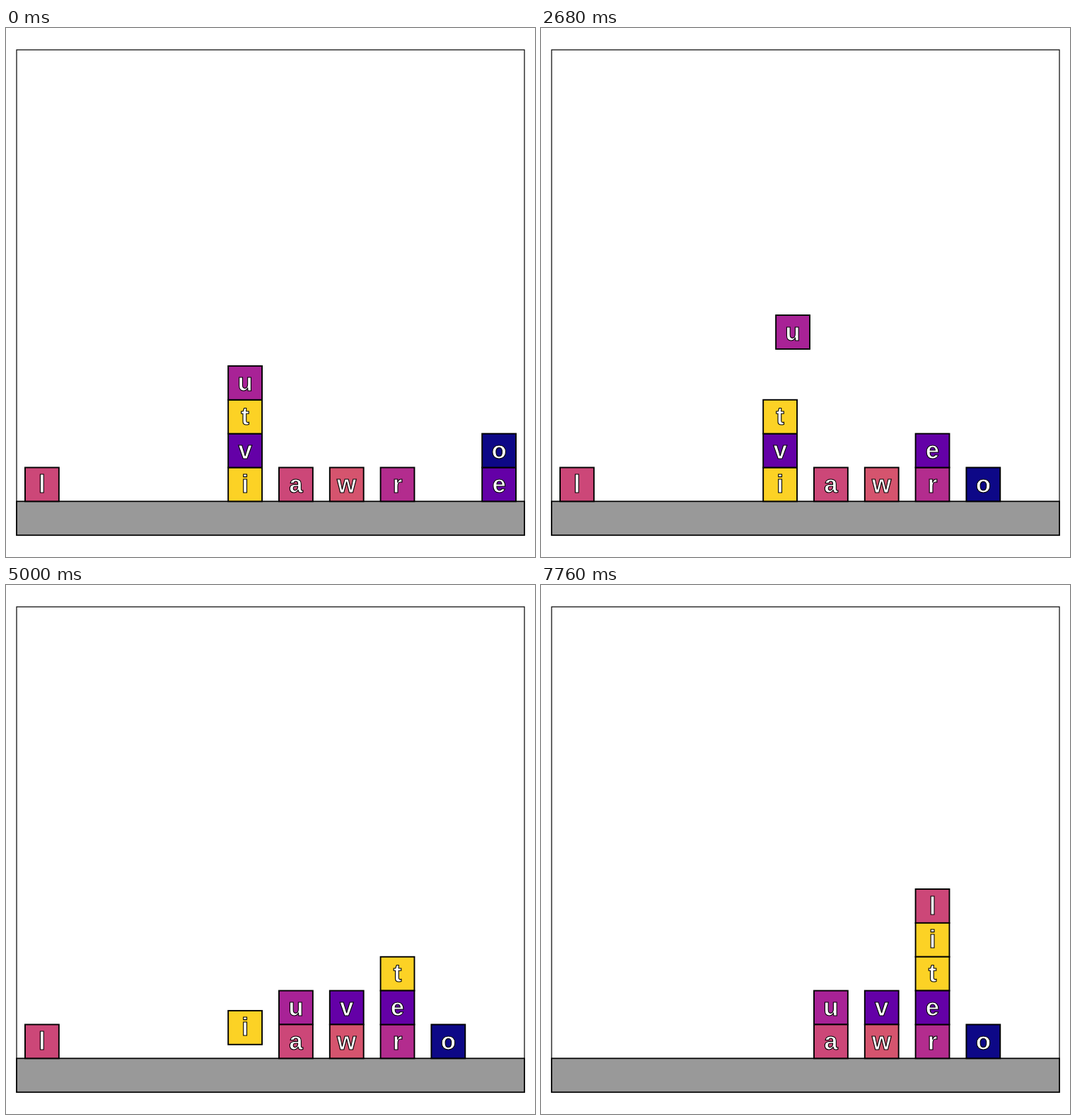
Recreate the animation shown at these times as an HTML page. Size 748x748 px, loop 7.8 s.

```html
<!DOCTYPE html>
<html lang="en">
<head>
<meta charset="utf-8">
<title>Stacking blocks</title>
<style>
  html, body { margin: 0; width: 100%; height: 100%; overflow: hidden; background: #fff; }
  svg { display: block; width: 748px; height: 748px; }
  text {
    font: bold 35px "Liberation Sans", Arial, sans-serif;
    text-anchor: middle;
    fill: #fff;
    stroke: #000;
    stroke-width: 1.1;
  }
</style>
</head>
<body>
<svg id="stage" viewBox="0 0 748 748"></svg>
<script>
const TICK = 40;
const TICKS = 195;
const SIDE = 47.87;
const COL = SIDE * 1.5;
const LEFT = 15;
const FLOOR = 669.35;
const TICKS_PER_ROW = 2.5;
const CLEARANCE = 1.5;

// letter: [colour, column, row]
const START = {
  l: ['#cc4778', 0, 0],
  i: ['#fcd225', 4, 0],
  v: ['#6400a7', 4, 1],
  t: ['#fcd225', 4, 2],
  u: ['#a82296', 4, 3],
  a: ['#cc4778', 5, 0],
  w: ['#d5546e', 6, 0],
  r: ['#b32c8e', 7, 0],
  e: ['#6400a7', 9, 0],
  o: ['#0d0887', 9, 1]
};

// [letter, destination column], one after another
const MOVES = [['o', 8], ['e', 7], ['u', 5], ['t', 7], ['v', 6], ['i', 7], ['l', 7]];

const stage = document.getElementById('stage');

function add(parent, tag, attrs) {
  const node = document.createElementNS('http://www.w3.org/2000/svg', tag);
  for (const key in attrs) node.setAttribute(key, attrs[key]);
  return parent.appendChild(node);
}

function addBox(parent, x, y, width, height, fill, line) {
  add(parent, 'rect', { x, y, width, height, fill, stroke: '#000', 'stroke-width': line });
}

addBox(stage, LEFT, 30.9, COL * 10, 686.2, '#fff', 1.2);
addBox(stage, LEFT, FLOOR, COL * 10, SIDE, '#999', 1.7);

const blocks = {};
for (const letter in START) {
  const group = add(stage, 'g', {});
  addBox(group, 0, 0, SIDE, SIDE, START[letter][0], 1.9);
  add(group, 'text', { x: SIDE / 2, y: 35.6 }).textContent = letter;
  blocks[letter] = group;
}

// Lift, carry and lower each block above the tallest remaining stack.
function plan() {
  const heights = Array(10).fill(0);
  const spots = {};
  for (const letter in START) {
    const [, col, row] = START[letter];
    spots[letter] = [col, row];
    heights[col]++;
  }
  const legs = [];
  let tick = 0;
  for (const [letter, target] of MOVES) {
    const [col, row] = spots[letter];
    heights[col]--;
    const top = Math.max(...heights) + CLEARANCE;
    const path = [[col, row], [col, top], [target, top], [target, heights[target]]];
    for (let k = 1; k < path.length; k++) {
      const from = path[k - 1], to = path[k];
      const rows = Math.abs(to[0] - from[0]) * 1.5 + Math.abs(to[1] - from[1]);
      const length = Math.round(rows * TICKS_PER_ROW);
      legs.push({ letter, from, to, start: tick, length });
      tick += length;
    }
    heights[target]++;
    spots[letter] = path[3];
  }
  return legs;
}

const legs = plan();

function place(letter, col, row) {
  const x = LEFT + SIDE / 4 + col * COL;
  const y = FLOOR - SIDE * (row + 1);
  blocks[letter].setAttribute('transform', `translate(${x.toFixed(2)} ${y.toFixed(2)})`);
}

function draw(tick) {
  for (const letter in START) place(letter, START[letter][1], START[letter][2]);
  for (const { letter, from, to, start, length } of legs) {
    if (tick <= start) break;
    const p = Math.min(1, (tick - start) / length);
    place(letter, from[0] + (to[0] - from[0]) * p, from[1] + (to[1] - from[1]) * p);
  }
}

const begin = performance.now();

function loop() {
  draw(Math.floor((performance.now() - begin) / TICK) % TICKS);
  requestAnimationFrame(loop);
}

loop();
</script>
</body>
</html>
```
